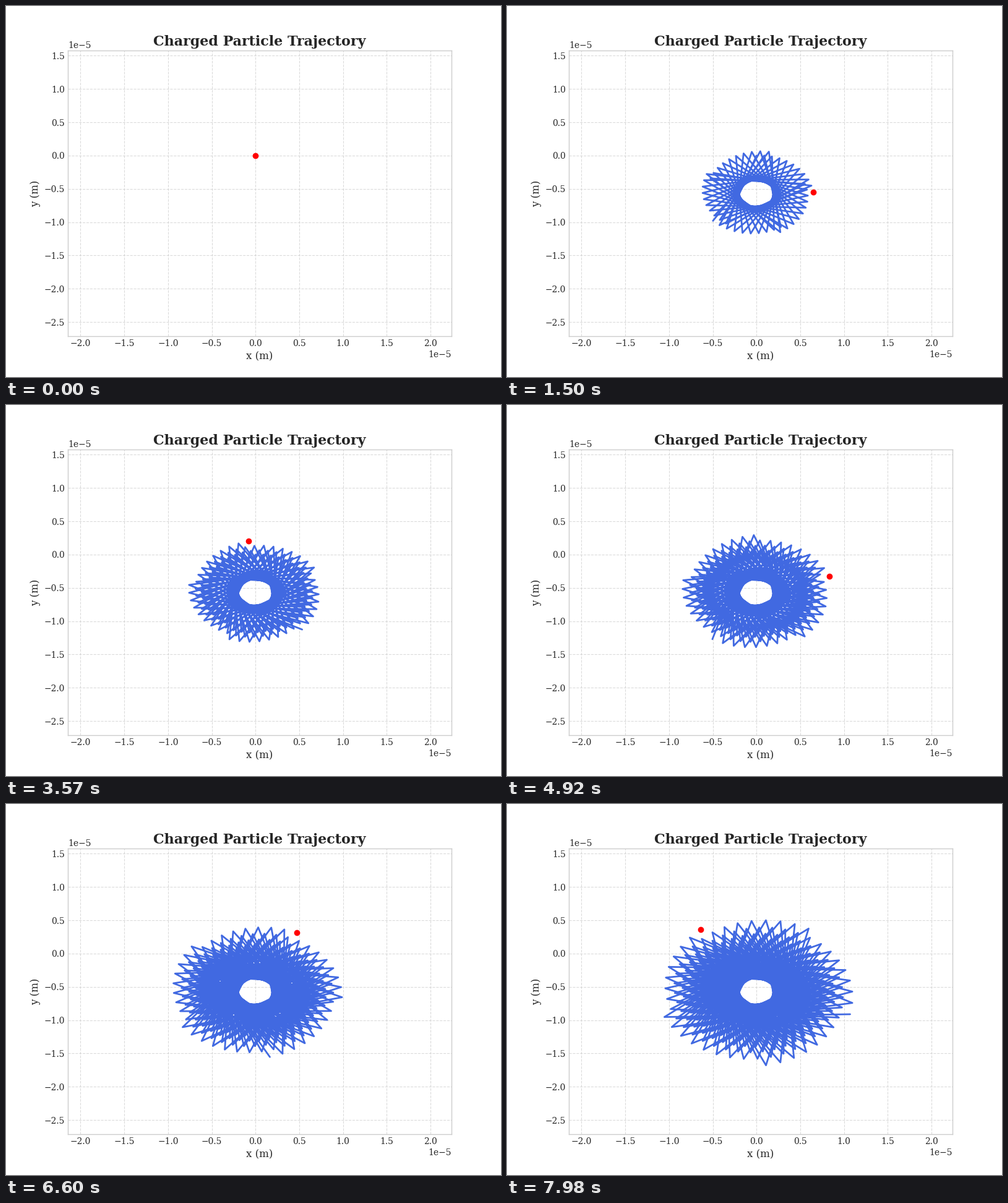
Recreate the animation shown at these times as a matplotlib script. Size 800 px wide and 600 px high, loop 8000 ms.

```python
import numpy as np
import matplotlib.pyplot as plt
from matplotlib.animation import FuncAnimation

FRAMES = 267
LOOP_MS = 8000

# Electron-like particle in a uniform 1 T field
OMEGA = 1.6e-19 / 9.11e-31
SPEED = 1e6
DT = 1e-7 / 499
RTOL, ATOL = 1e-3, 1e-6

# Dormand-Prince 5(4) coefficients
A = [np.array(row) for row in (
    [1 / 5],
    [3 / 40, 9 / 40],
    [44 / 45, -56 / 15, 32 / 9],
    [19372 / 6561, -25360 / 2187, 64448 / 6561, -212 / 729],
    [9017 / 3168, -355 / 33, 46732 / 5247, 49 / 176, -5103 / 18656],
)]
B = np.array([35 / 384, 0, 500 / 1113, 125 / 192, -2187 / 6784, 11 / 84])
E = np.array([-71 / 57600, 0, 71 / 16695, -71 / 1920,
              17253 / 339200, -22 / 525, 1 / 40])
P = np.array([
    [1, -8048581381 / 2820520608, 8663915743 / 2820520608,
     -12715105075 / 11282082432],
    [0, 0, 0, 0],
    [0, 131558114200 / 32700410799, -68118460800 / 10900136933,
     87487479700 / 32700410799],
    [0, -1754552775 / 470086768, 14199869525 / 1410260304,
     -10690763975 / 1880347072],
    [0, 127303824393 / 49829197408, -318862633887 / 49829197408,
     701980252875 / 199316789632],
    [0, -282668133 / 205662961, 2019193451 / 616988883,
     -1453857185 / 822651844],
    [0, 40617522 / 29380423, -110615467 / 29380423, 69997945 / 29380423],
])


def rhs(u):
    return np.array([u[2], u[3], OMEGA * u[3], -OMEGA * u[2]])


def try_step(u, f, h):
    """One step: new state, stage slopes and scaled error."""
    k = np.empty((7, 4))
    k[0] = f
    for s, a in enumerate(A, 1):
        k[s] = rhs(u + h * (a @ k[:s]))
    new = u + h * (B @ k[:6])
    k[6] = rhs(new)
    scale = ATOL + RTOL * np.maximum(np.abs(u), np.abs(new))
    ratio = h * (E @ k) / scale
    # the mean runs over all six components; z and vz stay zero
    return new, k, np.sqrt(ratio @ ratio / 6)


def trajectory(count):
    """Positions at even times, from adaptive steps with dense output."""
    u = np.array([0.0, 0.0, SPEED, 0.0])
    f = rhs(u)
    t, h = 0.0, 1e-9 / OMEGA
    points = []
    while len(points) < count:
        rejected = False
        while True:
            new, k, err = try_step(u, f, h)
            factor = 0.9 * err ** -0.2 if err else 10
            if err < 1:
                break
            h *= max(0.2, factor)
            rejected = True
        while len(points) < count and len(points) * DT <= t + h:
            s = (len(points) * DT - t) / h
            weights = P @ s ** np.arange(1, 5)
            points.append((u + h * (weights @ k))[:2])
        t += h
        u, f = new, k[6]
        h *= min(1 if rejected else 10, factor)
    return np.array(points).T


x, y = trajectory(FRAMES)

plt.rcParams.update({
    "font.family": "DejaVu Serif",
    "text.color": "0.15",
    "axes.labelcolor": "0.15",
    "axes.edgecolor": "0.8",
    "axes.linewidth": 1,
    "axes.axisbelow": True,
    "grid.color": "0.8",
    "lines.solid_capstyle": "round",
    "xtick.color": "0.15",
    "ytick.color": "0.15",
    "xtick.major.size": 0,
    "ytick.major.size": 0,
})

fig, ax = plt.subplots(figsize=(8, 6), dpi=100)
ax.set_xlim(-2.1446e-5, 2.240e-5)
ax.set_ylim(-2.7135e-5, 1.578e-5)
ax.set_title("Charged Particle Trajectory", fontsize=16, fontweight="bold")
ax.set_xlabel("x (m)", fontsize=12)
ax.set_ylabel("y (m)", fontsize=12)
ax.grid(True, linestyle="--", alpha=0.7)

trail, = ax.plot([], [], color="royalblue", lw=2)
particle, = ax.plot([], [], "ro", markersize=6)


def update(i):
    trail.set_data(x[:i], y[:i])
    particle.set_data([x[i]], [y[i]])
    return trail, particle


anim = FuncAnimation(fig, update, frames=FRAMES, interval=LOOP_MS / FRAMES,
                     repeat=True, repeat_delay=0)
plt.show()
```
